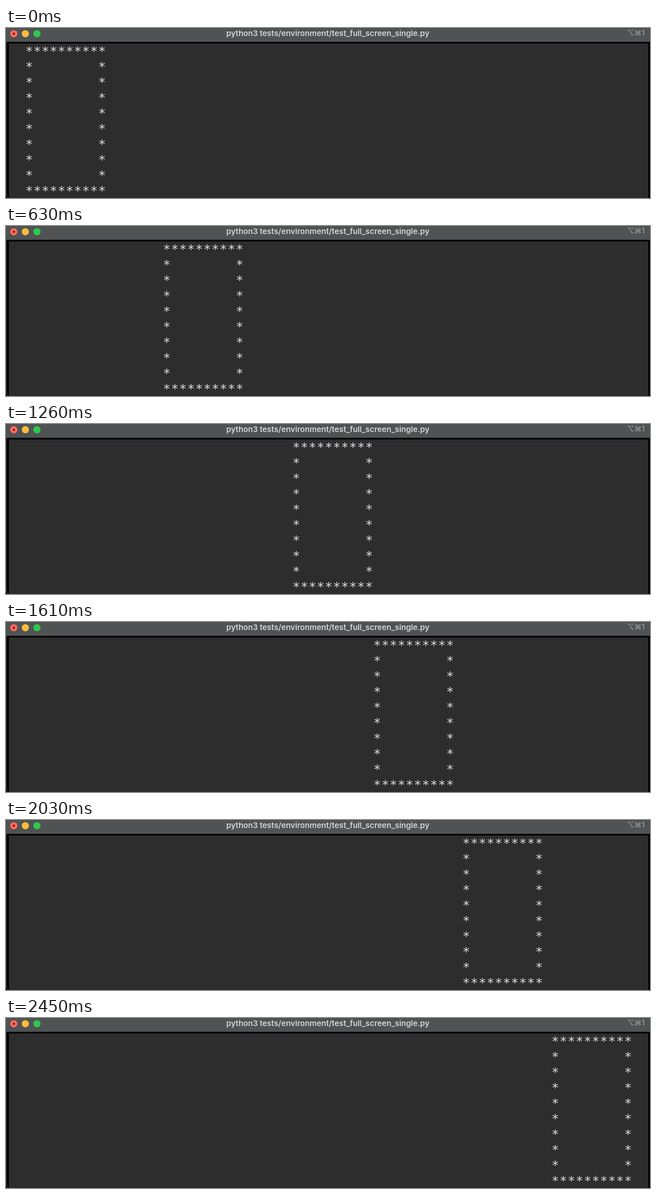
Recreate the animation shown at these times as an HTML page with a canvas. Size 1114 by 296 pixels, loop 2.52 s.

```html
<!DOCTYPE html>
<html lang="en">
<head>
<meta charset="utf-8">
<title>Moving box in a terminal</title>
<style>
html, body { margin: 0; width: 100%; height: 100%; overflow: hidden; background: #000; }
canvas { display: block; }
</style>
</head>
<body>
<canvas id="stage" width="1114" height="296"></canvas>
<script>
const ctx = document.getElementById('stage').getContext('2d');
const STEP = 70, STEPS = 36, CELL = 14, ROW = 27, SIZE = 10;

function rect(color, x, y, w, h) {
  ctx.fillStyle = color;
  ctx.fillRect(x, y, w, h);
}

function disc(color, x, y, r) {
  ctx.fillStyle = color;
  ctx.beginPath();
  ctx.arc(x, y, r, 0, 2 * Math.PI);
  ctx.fill();
}

// Draws a label at the font size that gives it the wanted width.
function label(text, color, weight, x, y, width) {
  const font = size => `${weight} ${size}px Inter, "DejaVu Sans", sans-serif`;
  ctx.font = font(13);
  ctx.font = font(13 * width / ctx.measureText(text).width);
  ctx.textAlign = 'left';
  ctx.fillStyle = color;
  ctx.fillText(text, x, y);
}

function drawWindow() {
  rect('#000', 0, 0, 1114, 296);
  rect('#4f5353', 0, 0, 1114, 24);
  rect('#2d2d2d', 5, 27, 1106, 269);
  rect('#3c3e3e', 0, 24, 1, 266);
  ctx.strokeStyle = '#555';
  ctx.beginPath();
  ctx.moveTo(0.5, 288);
  ctx.quadraticCurveTo(0.5, 293, 4, 296);
  ctx.stroke();
  disc('#ff6b60', 13.5, 10, 6.2);
  disc('#8c1008', 13.5, 10, 2);
  disc('#fdbd3e', 33.5, 10, 6.2);
  disc('#2fc94c', 53.5, 10, 6.2);
  label('python3 tests/environment/test_full_screen_single.py', '#d3d5d5', 600, 381, 14.3, 352);
  label('⌥⌘1', '#929595', 600, 1074, 13.3, 31);
}

function drawBox(column) {
  rect('#2d2d2d', 5, 27, 1106, 269);
  ctx.font = '22px "DejaVu Sans Mono", monospace';
  ctx.textAlign = 'center';
  ctx.fillStyle = '#dedede';
  const ink = ctx.measureText('*');
  const shift = (ink.actualBoundingBoxAscent - ink.actualBoundingBoxDescent) / 2;
  const last = SIZE - 1;
  for (let row = 0; row < SIZE; row++) {
    const edge = row === 0 || row === last;
    for (let i = 0; i < SIZE; i += edge ? 1 : last) {
      ctx.fillText('*', 40 + (column + i) * CELL, 37.3 + row * ROW + shift);
    }
  }
}

// Two columns per step, with one column skipped every 6.25 steps.
const columnAt = step => 2 * step - Math.floor((step + 0.75) / 6.25);

const start = performance.now();
function frame() {
  const time = Math.max(0, performance.now() - start);
  drawWindow();
  drawBox(columnAt(Math.floor(time / STEP) % STEPS));
  requestAnimationFrame(frame);
}
frame();
</script>
</body>
</html>
```
